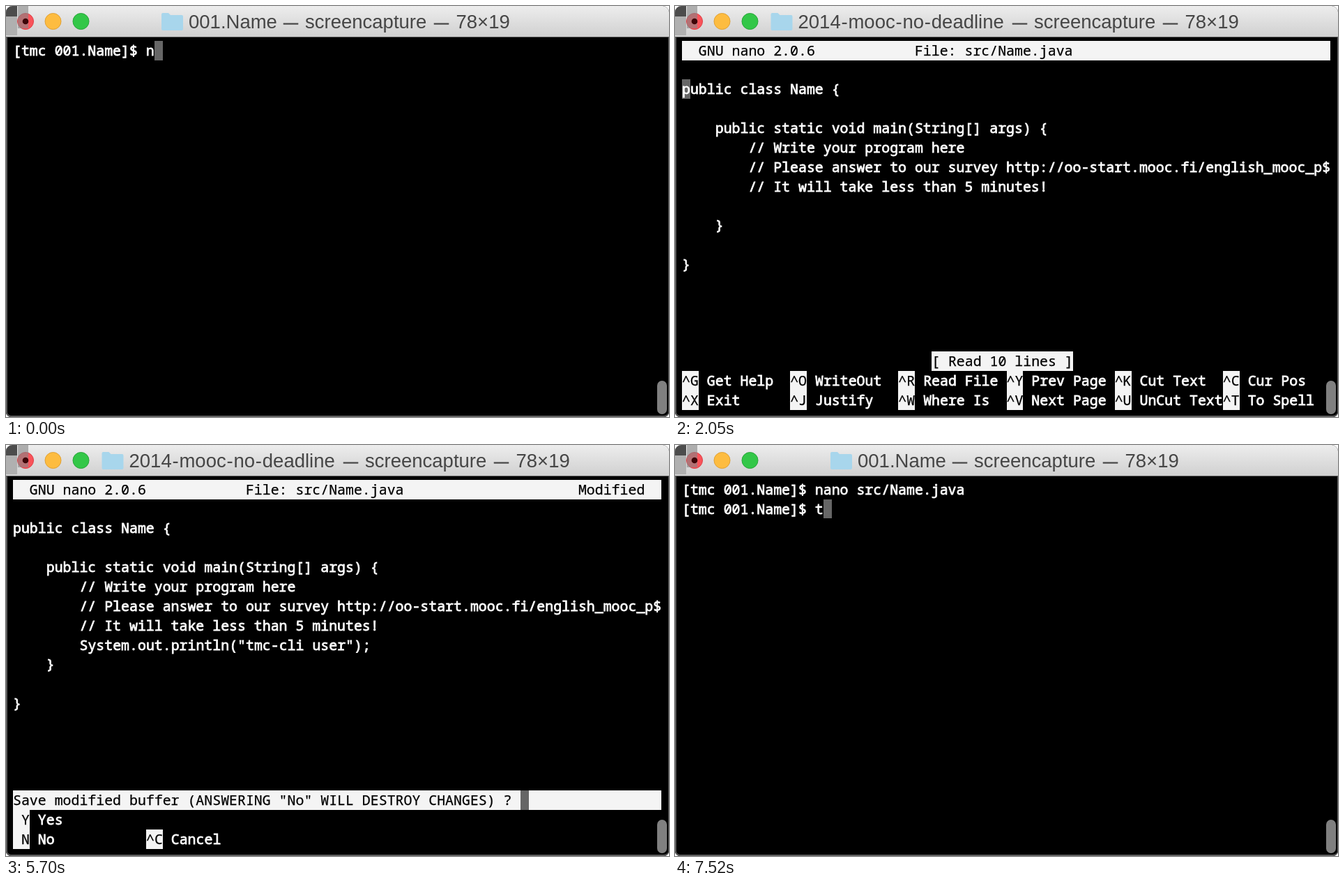
Recreate the animation shown at these times as an HTML page. Size 951 px wide and 589 px high, loop 8000 ms.

```html
<!DOCTYPE html>
<html lang="en">
<head>
<meta charset="utf-8">
<title>Terminal</title>
<style>
  html, body { margin: 0; width: 100%; height: 100%; overflow: hidden; background: #fff; }
  #win { position: absolute; left: 0; top: 0; width: 951px; height: 589px; overflow: hidden;
    background: #000; border-radius: 9px 9px 7px 7px; }
  #win::after { content: ""; position: absolute; inset: 44px 0 0; border: solid #5a5a5a;
    border-width: 1px 1px 2px 2px; border-radius: 0 0 7px 7px; }
  #bar { position: absolute; width: 951px; height: 44px; background: linear-gradient(#ededed, #d0d0d0);
    font: 27.5px/44px "Liberation Sans", Arial, sans-serif; color: #464646; }
  #bar svg { position: absolute; left: 0; top: 0; }
  #bar span { position: absolute; top: 1px; white-space: pre; }
  #bar i { font-style: normal; padding: 0 .8px; }
  #bar .dash { font-size: 21px; top: 2px; -webkit-text-stroke: .6px; }
  #screen { position: absolute; inset: 0; color: #fff;
    font: 19.893px/27.85px "Noto Sans Mono", "DejaVu Sans Mono", monospace; font-variant-ligatures: none; }
  #screen span { position: absolute; height: 27.85px; white-space: pre; -webkit-text-stroke: .8px; }
  #screen .inv { background: #f4f4f4; color: #000; -webkit-text-stroke: .25px; }
  #screen .cur { background: #666; width: 11.94px; }
  #thumb { position: absolute; left: 934px; top: 537px; width: 14px; height: 48px;
    border-radius: 7px; background: rgba(255, 255, 255, .5); }
</style>
</head>
<body>
<div id="win">
  <div id="screen"></div>
  <div id="bar">
    <svg width="951" height="44">
      <circle cx="28" cy="22" r="11.5" fill="#f9535a" stroke="#dd4148"/>
      <circle cx="67.5" cy="22" r="11.5" fill="#fdbc40" stroke="#e0a135"/>
      <circle cx="107.5" cy="22" r="11.5" fill="#33c748" stroke="#2aa63a"/>
      <path d="M17 0h15v32H17z" fill="#858585" opacity=".6"/>
      <path d="M0 14h16v28H0z" fill="#b0b0b0"/>
      <path d="M0 0h16v15H0z" fill="#4c4c4c"/>
      <circle cx="28" cy="22" r="4.3" fill="#3d0508"/>
      <path id="folder" d="M0 2q0-2 2-2h8l3 3h16q2 0 2 2v18q0 2-2 2H2q-2 0-2-2z" fill="#a8d6ec"/>
    </svg>
    <span id="name"></span>
    <div id="rest" style="position:absolute;left:0;top:0">
      <span class="dash">—</span><span style="left:31px">screencapture</span>
      <span class="dash" style="left:216px">—</span><span style="left:247.5px">78×19</span>
    </div>
  </div>
  <div id="thumb"></div>
</div>
<script>
const $ = id => document.getElementById(id);
const LOOP = 8000, X0 = 10, Y0 = 49.7, CW = 931 / 78, RH = 27.85;
const PROMPT = "[tmc 001.Name]$ ", CMD = "nano src/Name.java ";
const CODE = [
  "public class Name {", "",
  "    public static void main(String[] args) {",
  "        // Write your program here",
  "        // Please answer to our survey http://oo-start.mooc.fi/english_mooc_p$",
  "        // It will take less than 5 minutes!", "",
  "    }", "", "}"
];
const PRINT = 'System.out.println("tmc-cli user");';
const ASK = 'Save modified buffer (ANSWERING "No" WILL DESTROY CHANGES) ? ';
const MAIN = ["^G Get Help", "^X Exit", "^O WriteOut", "^J Justify", "^R Read File", "^W Where Is",
  "^Y Prev Page", "^V Next Page", "^K Cut Text", "^U UnCut Text", "^C Cur Pos", "^T To Spell"];
const WRITE = ["^G Get Help", "^C Cancel", "^T To Files", "M-D DOS Format",
  "M-M Mac Format", "M-A Append", "M-P Prepend", "M-B Backup File"];

let html = "", shown = "";

function span(col, row, text, cls = "") {
  const x = (X0 + col * CW).toFixed(2), y = (Y0 + row * RH).toFixed(2);
  html += `<span class="${cls}" style="left:${x}px;top:${y}px">${text}</span>`;
}
const inv = (col, row, text) => span(col, row, text, "inv");
const cursor = (col, row) => span(col, row, "", "cur");

function hint(col, row, text) {
  const cut = text.indexOf(" ");
  inv(col, row, text.slice(0, cut));
  span(col + cut, row, text.slice(cut));
}
const menu = (items, step) =>
  items.forEach((s, i) => hint((i >> 1) * step, 17 + i % 2, s));

function shell(t) {
  if (t >= 7420) {
    cursor(t < 7520 ? 16 : 17, 1);
    span(0, 0, PROMPT + CMD);
    span(0, 1, PROMPT + (t < 7520 ? "" : "t"));
  } else if (t >= 1850) {
    cursor(0, 0);
  } else {
    const n = t < 370 ? 1 : t < 1020 ? 2 + Math.min(5, Math.floor((t - 370) / 84)) : t < 1210 ? 9 : 19;
    if (t < 1530) cursor(16 + n, 0); else cursor(0, 1);
    span(0, 0, PROMPT + CMD.slice(0, n));
  }
}

function nano(t) {
  const modified = t >= 3750 && t < 6800;
  inv(0, 0, ("  GNU nano 2.0.6".padEnd(28) + "File: src/Name.java").padEnd(68)
    + (modified ? "Modified" : "").padEnd(10));
  if (t < 3750) cursor(0, 2 + [2150, 2970, 3110, 3250, 3390, 3560].filter(k => t >= k).length);
  else if (t < 4080) cursor(8, 8);
  else if (t < 5700) cursor(43, 8);
  CODE.forEach((s, i) => span(0, 2 + i, s));
  if (t >= 4080) span(8, 8, PRINT);

  if (t < 5700) {
    if (t < 4080) inv(30, 16, "[ Read 10 lines ]");
    menu(MAIN, 13);
  } else if (t < 6440) {
    inv(0, 16, ASK.padEnd(78));
    cursor(61, 16);
    inv(0, 17, " Y"); span(3, 17, "Yes");
    inv(0, 18, " N"); span(3, 18, "No");
    hint(16, 18, "^C Cancel");
  } else if (t < 6800) {
    inv(0, 16, "File Name to Write: src/Name.java".padEnd(78));
    cursor(33, 16);
    menu(WRITE, 19);
  } else {
    inv(30, 16, "[ Wrote 10 lines ]");
    cursor(77, 18);
  }
}

function title(text, x, restX) {
  $("name").innerHTML = text.replace(/-/g, "<i>-</i>");
  $("name").style.left = x + "px";
  $("rest").style.left = restX + "px";
  $("folder").setAttribute("transform", `translate(${x - 39} 10)`);
}

function frame(now) {
  const t = now % LOOP;
  html = "";
  if (t >= 2050 && t < 7420) nano(t); else shell(t);
  if (html !== shown) {
    $("screen").innerHTML = shown = html;
    if (t >= 1850 && t < 7420) title("2014-mooc-no-deadline", 176.5, 484);
    else title("001.Name", 262, 398);
  }
  requestAnimationFrame(frame);
}
frame(performance.now());
</script>
</body>
</html>
```
